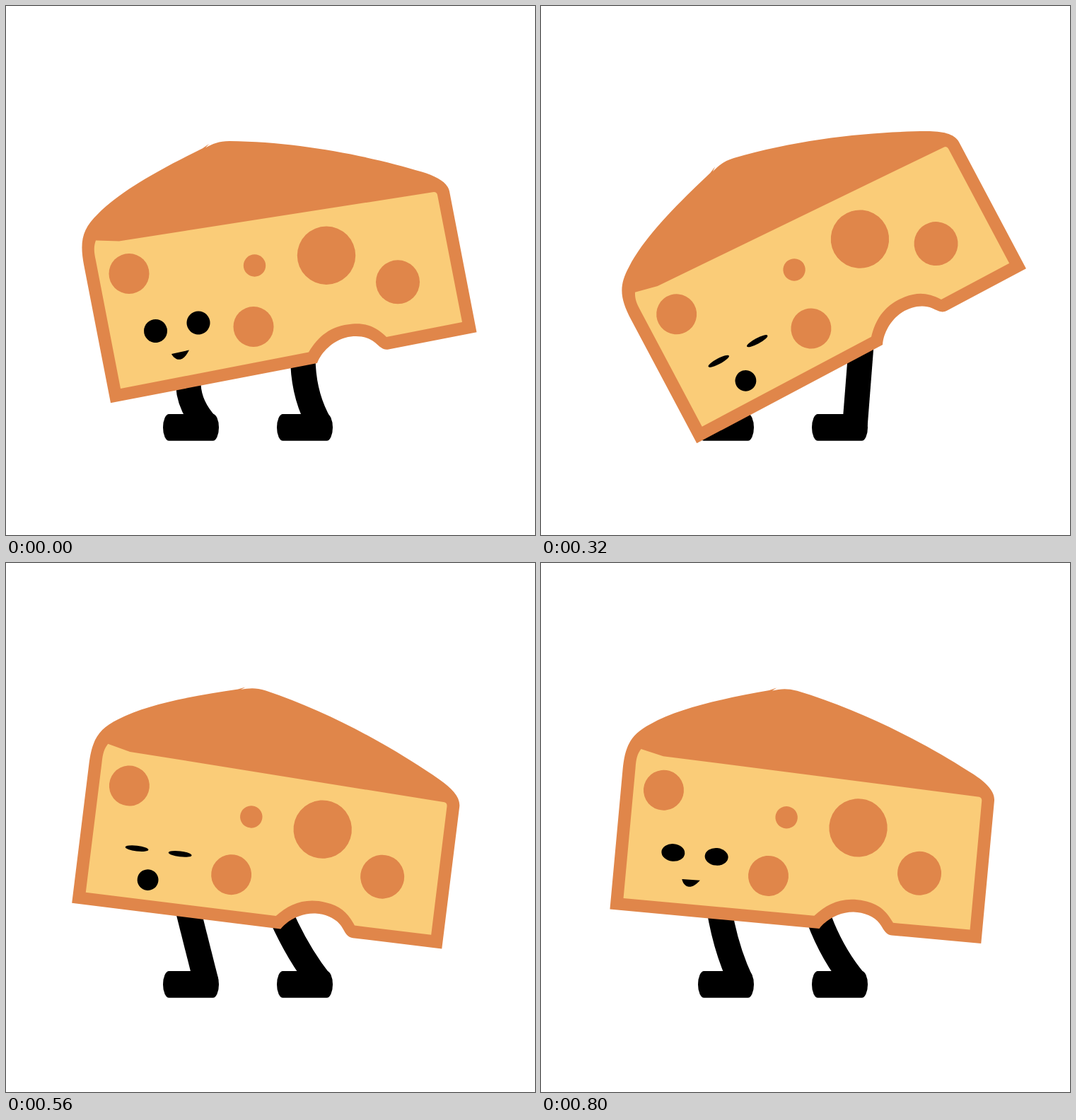
Recreate the animation shown at these times as an HTML page. Size 748x748 px, loop 880 ms.

```html
<!DOCTYPE html>
<html lang="en">
<head>
<meta charset="utf-8">
<title>Walking cheese</title>
<style>
html, body { margin: 0; width: 100%; height: 100%; overflow: hidden; background: #fff; }
svg { display: block; width: 100%; height: 100%; }
.rind { fill: #e0864a; }
.paste { fill: #facc78; }
.leg { fill: none; stroke: #000; stroke-width: 35.5; }
</style>
</head>
<body>
<svg viewBox="0 0 748 748">
  <path class="leg"/>
  <path class="leg"/>
  <rect id="foot" x="222" y="577" width="79" height="37.8" rx="8.5" ry="18.9"/>
  <use href="#foot" x="161"/>
  <g id="body">
    <path class="rind" d="M148 561.3L110.3 367C104 334 107 316 130 294C163 260 224 228 278 201.3L287 195L282 200.5
      C292 195 301 191 316 191C415 192 515 212.5 588 234.5C609 241 624 249 627 262L665.5 461.3L541 485.5
      C533 487 529 482 522 476C512 467 495 465 480 469C462 474 446 489 440 505Z"/>
    <path class="paste" d="M162 541L127 360C124 346 124 340 127 331.5L160 332.5L605 263Q609 263 610 267L645 447L538 468
      C523 453 509 448 490 449.5C458 452 441 468 428 489.5Z"/>
    <g class="rind">
      <circle cx="174" cy="378.5" r="28.5"/>
      <circle cx="351.5" cy="367" r="15.7"/>
      <circle cx="453" cy="352.7" r="41.2"/>
      <circle cx="554" cy="390.3" r="31"/>
      <circle cx="350" cy="453.5" r="28.5"/>
    </g>
    <ellipse class="eye" rx="16.5" transform="translate(211.5 459.5) rotate(-11)"/>
    <ellipse class="eye" rx="16.5" transform="translate(272 448) rotate(-11)"/>
    <path id="smile" d="M234 492L259 486.5C254 496 250 499.5 245 499.8C240 500 236 496 234 492Z"/>
    <circle id="gasp" cx="240" cy="497" r="14.9"/>
  </g>
</svg>
<script>
const STEP = 80, STEPS = 11;
const pivot = { x: 374.7, y: 348 };

// [step, value] pairs, joined by straight lines
const tilt = [[0, 0], [4, -17], [6, 0], [7, 18], [9, 32.45], [11, 0]];
const lid = [[0, 16.5], [2, 16.5], [4, 4], [8, 4], [11, 16.5]];

// The hip turns with the body, the ankle stays; a leg shorter than its reach bends
const legs = [
  { hip: { x: 277, y: 472 }, ankle: { x: 283, y: 592 }, reach: 161 },
  { hip: { x: 421, y: 471 }, ankle: { x: 444, y: 592 }, reach: 131 }
];
const BEND = 3.5;

const $ = id => document.getElementById(id);
const legPaths = document.querySelectorAll('.leg');
const eyes = document.querySelectorAll('.eye');

function track(points, n) {
  const i = points.findIndex(p => p[0] > n);
  const [t0, v0] = points[i - 1], [t1, v1] = points[i];
  return v0 + (v1 - v0) * (n - t0) / (t1 - t0);
}

function turn(p, deg) {
  const a = deg * Math.PI / 180, c = Math.cos(a), s = Math.sin(a);
  const x = p.x - pivot.x, y = p.y - pivot.y;
  return { x: pivot.x + c * x - s * y, y: pivot.y + s * x + c * y };
}

function legPath({ hip, ankle, reach }, deg) {
  const h = turn(hip, deg);
  const dx = ankle.x - h.x, dy = ankle.y - h.y, d = Math.hypot(dx, dy);
  const sag = 2 * BEND * Math.sqrt(Math.max(0, reach - d));
  const kx = h.x + dx * 0.55 - dy / d * sag;
  const ky = h.y + dy * 0.55 + dx / d * sag;
  return `M${h.x} ${h.y}Q${kx} ${ky} ${ankle.x} ${ankle.y}`;
}

function draw(ms) {
  const n = Math.floor(ms / STEP) % STEPS;
  const deg = track(tilt, n), open = track(lid, n);

  $('body').setAttribute('transform', `rotate(${deg} ${pivot.x} ${pivot.y})`);
  legs.forEach((leg, i) => legPaths[i].setAttribute('d', legPath(leg, deg)));
  eyes.forEach(e => e.setAttribute('ry', open));
  $('smile').style.display = open > 9 ? '' : 'none';
  $('gasp').style.display = open > 9 ? 'none' : '';
}

const start = performance.now();
function tick() {
  draw(performance.now() - start);
  requestAnimationFrame(tick);
}
tick();
</script>
</body>
</html>
```
